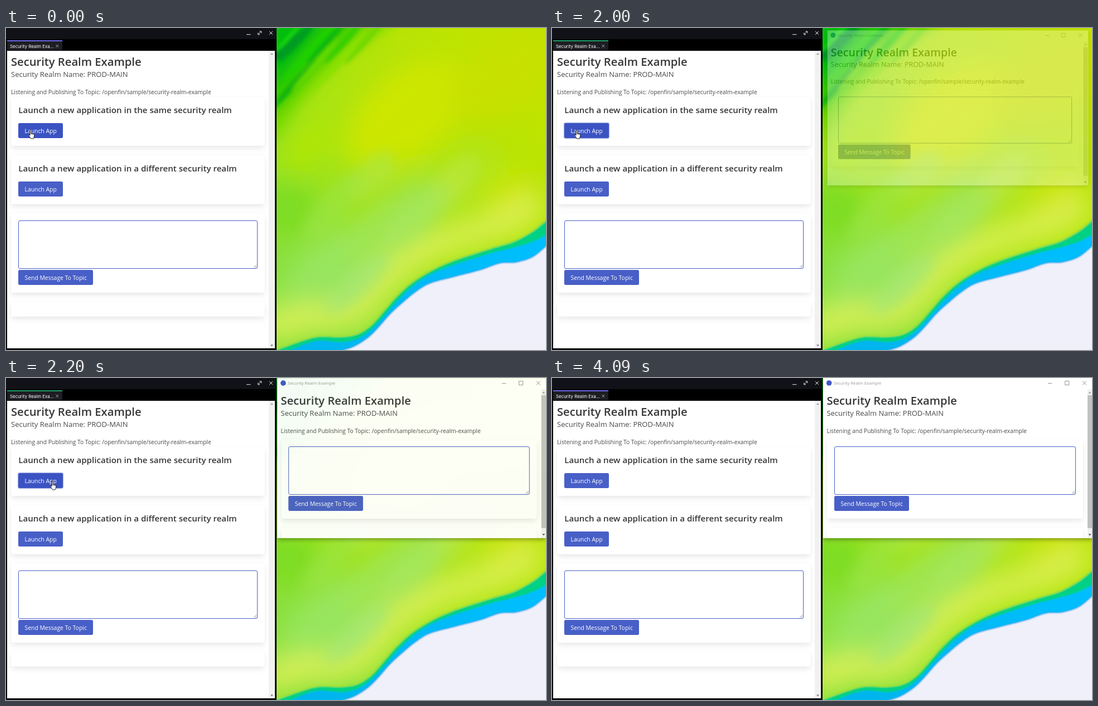
An HTML page for the animation above (4220 ms loop, 968 px wide and 579 px high).

```html
<!DOCTYPE html>
<html lang="en">
<head>
<meta charset="utf-8">
<title>Security Realm Example</title>
<style>
html, body { margin: 0; width: 100%; height: 100%; overflow: hidden; background: #000; }
body { position: relative; font-family: "Open Sans", "Noto Sans", sans-serif; }
div, svg { position: absolute; box-sizing: border-box; }
svg { left: 0; top: 0; overflow: visible; }
.text { line-height: 0; white-space: pre; }
.card { background: #fff; border-radius: 4px; box-shadow: 0 5px 11px -1.5px rgba(10,10,10,.1), 0 0 0 .7px rgba(10,10,10,.02); }
.area { background: #fff; border: 1px solid #485fc7; border-radius: 3px; }
.button { background: #485fc7; border-radius: 2.7px; }
.button.hover { background: #3b53c2; }
.button.active { background: #344bb5; }
.button.ring { box-shadow: 0 0 0 1.4px rgba(72,95,199,.35); }
#popup { left: 486px; top: 0; width: 483px; height: 288px; transform-origin: 239px 135px; background: #fff; box-shadow: 0 2px 8px rgba(0,0,0,.4); }
#page { left: 0; top: 0; width: 483px; height: 288px; overflow: hidden; }
</style>
</head>
<body>
<script>
const box = (x, y, w, h, cls = '', css = '', id = '') =>
  `<div id="${id}" class="${cls}" style="left:${x}px;top:${y}px;width:${w}px;height:${h}px;${css}"></div>`;
// y is the baseline
const text = (x, y, size, str, css = 'color:#4a4a4a') =>
  `<div class="text" style="left:${x}px;top:${y - .388 * size}px;font-size:${size}px;${css}">${str}</div>`;
const svg = body => `<svg width="968" height="579" fill="none">${body}</svg>`;
const bold = 'color:#363636;font-weight:600';
const white = 'color:#fff';

const button = (x, y, w, label, id) => box(x, y, w, 27, 'button', '', id) + text(x + 11.5, y + 18, 10.4, label, white);
const grip = (x, y) => svg(`<path d="M${x - 7} ${y - 2}l5-5M${x - 4} ${y - 2}l2-2" stroke="#777" stroke-width=".8"/>`);
const intro = (x, y) =>
  text(x, y, 20.2, 'Security Realm Example', bold) +
  text(x, y + 20.3, 13.03, 'Security Realm Name: PROD-MAIN') +
  text(x, y + 51.4, 10.28, 'Listening and Publishing To Topic: /openfin/sample/security-realm-example');
const composer = (x, y, w, id) =>
  box(x, y, w, 143, 'card') + box(x + 13, y + 13, w - 26, 87, 'area') +
  grip(x + w - 13, y + 100) + button(x + 13, y + 102, 134, 'Send Message To Topic', id);
const launcher = (y, h, title, id) =>
  box(9, y, 455, h, 'card') + text(22.3, y + h - 59, 15.12, title, bold) + button(22, y + h - 41, 80, 'Launch App', id);

// Smooth curve through every point
function smooth(p) {
  const at = i => p[Math.min(p.length - 1, Math.max(0, i))];
  const handle = (a, from, to, sign) => a.map((v, k) => v + sign * (to[k] - from[k]) / 6);
  let d = `M${p[0]}`;
  for (let i = 0; i < p.length - 1; i++)
    d += `C${handle(at(i), at(i - 1), at(i + 1), 1)} ${handle(at(i + 1), at(i), at(i + 2), -1)} ${at(i + 1)}`;
  return d;
}

function wallpaper() {
  const blob = (x, y, rx, ry, turn, color, opacity = 1) =>
    `<ellipse rx="${rx}" ry="${ry}" transform="translate(${x} ${y}) rotate(${turn})" fill="${color}" opacity="${opacity}"/>`;
  const streak = (x, y, length, width, color) => blob(x, y, length, width, -48, color);
  const shore = smooth([[972,344], [945,366], [910,385], [870,397], [800,420], [757,440], [725,461], [700,484],
    [680,507], [655,535], [630,551], [600,556], [565,555], [540,560], [505,572], [478,582]]);
  const water = smooth([[972,370], [945,384], [910,395], [870,405], [800,427], [757,445], [727,466], [702,490],
    [682,513], [657,540], [632,558], [602,565], [565,562], [540,567], [508,580], [500,584]]);
  const snow = smooth([[972,390], [945,412], [915,422], [885,424], [850,436], [800,449], [760,460], [735,475],
    [712,494], [690,514], [669,538], [650,557], [625,573], [598,582]]);
  const fill = (d, color) => `<path d="${d}L972 582Z" fill="${color}"/>`;
  return svg(`<defs>
    <clipPath id="desk"><path d="M485 0H968V579H485Z"/></clipPath>
    <filter id="soft" x="-50%" y="-50%" width="200%" height="200%"><feGaussianBlur stdDeviation="24"/></filter>
    <filter id="mid" x="-50%" y="-50%" width="200%" height="200%"><feGaussianBlur stdDeviation="11"/></filter>
    <filter id="fine" x="-20%" y="-20%" width="140%" height="140%"><feGaussianBlur stdDeviation="3"/></filter>
    <filter id="edge"><feGaussianBlur stdDeviation=".9"/></filter>
    <linearGradient id="leaf" gradientUnits="userSpaceOnUse" x1="485" y1="400" x2="880" y2="60">
      <stop stop-color="#88e038"/><stop offset=".4" stop-color="#a8e414"/><stop offset="1" stop-color="#c0e400"/>
    </linearGradient>
    <linearGradient id="sea" gradientUnits="userSpaceOnUse" x1="520" y1="0" x2="968" y2="0">
      <stop stop-color="#00b4ec"/><stop offset="1" stop-color="#00bfff"/>
    </linearGradient></defs>
    <g clip-path="url(#desk)">
      <path d="M485 0H968V579H485Z" fill="url(#leaf)"/>
      <g filter="url(#soft)">
        ${blob(720, 155, 130, 75, -40, '#cde600')}
        ${blob(890, 90, 110, 60, -35, '#c7e000')}
        ${blob(905, 300, 50, 32, -35, '#cfe600')}
        ${blob(820, 270, 70, 40, -45, '#b2e520')}
        ${blob(505, 325, 50, 50, 20, '#7cdc20')}
        ${blob(590, 430, 110, 60, -35, '#98e55e')}
        ${blob(700, 350, 110, 50, -40, '#a0e552')}
        ${blob(540, 215, 60, 28, -50, '#b0e600')}
        ${blob(495, 520, 50, 35, -20, '#a8e855')}
        <path d="${shore}" transform="translate(-16 -34)" stroke="#dcf056" stroke-width="46"/>
      </g>
      <g filter="url(#mid)">
        ${blob(655, 265, 55, 28, -45, '#aee640', .7)}
        ${blob(585, 320, 75, 25, -50, '#9be548', .55)}
        ${blob(805, 275, 55, 26, -48, '#bce83c', .6)}
        ${blob(735, 340, 80, 24, -43, '#a8e860', .5)}
        ${blob(630, 460, 75, 22, -43, '#a2e678', .6)}
        <path d="M470-20H715Q600 50 535 130Q505 175 470 215Z" fill="#7cda00"/>
        <path d="M470-20H645Q570 55 525 110Q500 140 470 170Z" fill="#30cc00"/>
        <path d="M470-20H585Q525 55 470 120Z" fill="#00bd0c"/>
      </g>
      <g filter="url(#fine)">
        ${streak(488, 43, 48, 7, '#009422')}
        ${streak(522, 22, 52, 8, '#009c20')}
        ${streak(506, 18, 34, 4, '#18d510')}
        ${streak(548, 38, 80, 7, '#1cd000')}
        ${streak(515, 102, 60, 5, '#08b010')}
        ${streak(576, 24, 56, 5, '#08b60c')}
        ${streak(554, 66, 62, 4, '#68dc00')}
        ${streak(612, 18, 62, 6, '#34cf00')}
        ${streak(596, 61, 75, 4, '#88e200')}
        ${streak(646, 22, 58, 5, '#70d800')}
      </g>
      <g filter="url(#edge)">
        <path d="${shore}" stroke="#9be238" stroke-width="6"/>
        ${fill(shore, '#05d184')}${fill(water, 'url(#sea)')}
        <path d="${snow}" stroke="#00a8ef" stroke-width="4"/>${fill(snow, '#eff0f9')}
      </g>
    </g>`);
}

const mainWindow =
  box(0, 0, 485, 579, '', 'background:#000') + box(0, 0, 485, 20, '', 'background:#111217') +
  box(2, 22, 99, 18, '', 'background:#1d1e23') + box(2, 22, 99, 1.5, '', '', 'accent') +
  text(7, 36, 7.9, 'Security Realm Exa...', white + ';font-family:Inter,sans-serif') +
  box(2, 41, 480, 535, '', 'background:#fff') + box(471, 41, 11, 535, '', 'background:#f1f1f1') +
  svg(`<path d="M431 11.7h7.5M472 6l6 6m0-6l-6 6M452 11.5l5.5-5.5M454.5 6h3.3v3.3M451.7 8.5v3.3H455" stroke="#e8e8e8"/>
    <path d="M89.5 30l4.5 4.7m0-4.7l-4.5 4.7" stroke="#ccc" stroke-width=".8"/>
    <path d="M474 48h5l-2.5-3z" fill="#999"/><path d="M474 569.5h5l-2.5 3z" fill="#777"/>`) +
  intro(9, 68) +
  launcher(124, 88, 'Launch a new application in the same security realm', 'launch') +
  launcher(229, 88, 'Launch a new application in a different security realm') +
  composer(9, 333, 455) + box(9, 492, 455, 27, 'card');

const popup = `<div id="popup"><div id="page">` +
  svg('<circle cx="10.7" cy="9" r="4.8" fill="#4058c8"/>' +
    '<path d="M403 9.5h7.5M433.7 5.5h7v7h-7zM465 5.5l7 7m0-7l-7 7" stroke="#888" stroke-width=".9"/>') +
  text(19, 12, 7.65, 'Security Realm Example', 'color:#999') +
  intro(6.4, 47.4) + composer(7, 110, 459, 'send') + box(7, 269, 459, 30, 'card') +
  box(473.5, 20, 10, 268, '', 'background:#f1f1f1') + box(474, 31, 8, 239, '', 'background:#c1c1c1') +
  svg('<path d="M475.5 27.5h5l-2.5-3z" fill="#999"/><path d="M475.5 280.5h5l-2.5 3z" fill="#505050"/>') +
  `</div></div>`;

const cursors = svg(`<g id="arrow"><path d="M0 0v11.4l2.6-2.4 1.7 3.8 1.7-.8-1.7-3.6h3.6z" fill="#fff" stroke="#111" stroke-width=".8"/></g>
  <g id="hand"><path d="M-1 .5c0-1.5 2.1-1.5 2.1 0v4.8l4 .9c1.3.3 1.9 1 1.7 2.3l-.7 4c-.2 1-.7 1.6-1 2.5H.7c-.9-1.8-2.2-3.2-3.8-5.2-.8-1 .5-2.1 1.3-1.4l.8.8z" fill="#fff" stroke="#111" stroke-width=".9"/>
  <path d="M1.1 5.2v2.3M3 5.8v2M4.9 6.3v1.8" stroke="#111" stroke-width=".7"/></g>`);

document.body.innerHTML = wallpaper() + popup + mainWindow + cursors;

const el = id => document.getElementById(id);
const [accent, launch, send, pop, arrow, hand] = ['accent', 'launch', 'send', 'popup', 'arrow', 'hand'].map(el);

// time, x, y, hand
const moves = [
  [0, 44, 184, 1], [2070, 58, 184, 1], [2130, 74, 185, 1], [2200, 83, 186, 1],
  [2270, 150, 192], [2330, 238, 200], [2400, 312, 206], [2460, 344, 208], [2530, 358, 209],
  [2790, 430, 206], [2860, 560, 214, 1], [2930, 620, 224, 1], [3130, 597, 375.5], [3200, 566, 420]
];

function pointer(t) {
  if (t < 3400) return moves.filter(m => m[0] <= t).pop();
  const u = Math.min(1, Math.floor((t - 3330) / 70) / 8);
  const p = u * u * (3 - 2 * u);
  return [t, 566 + 54 * p, 420 + 165 * p];
}

function draw(t) {
  const [, x, y, pointing] = pointer(t);
  arrow.style.display = pointing ? 'none' : '';
  hand.style.display = pointing ? '' : 'none';
  (pointing ? hand : arrow).setAttribute('transform', `translate(${x} ${y})`);

  const focused = t >= 1060 && t < 4090;
  accent.style.background = focused ? '#1f9d68' : '#6a67e8';
  launch.classList.toggle('hover', t < 2270);
  launch.classList.toggle('active', t >= 1060 && t < 1190);
  launch.classList.toggle('ring', focused);
  send.classList.toggle('hover', t >= 2860 && t < 3130);

  const rest = 1 - Math.min(1, Math.max(0, Math.floor((t - 1995) / 66.7) / 4));
  pop.style.opacity = t < 2000 ? 0 : 1 - .7 * rest ** 2;
  pop.style.transform = `scale(${1 - .032 * rest ** 2.5})`;
}

const start = performance.now();
function loop() {
  draw((performance.now() - start) % 4220);
  requestAnimationFrame(loop);
}
loop();
</script>
</body>
</html>
```
